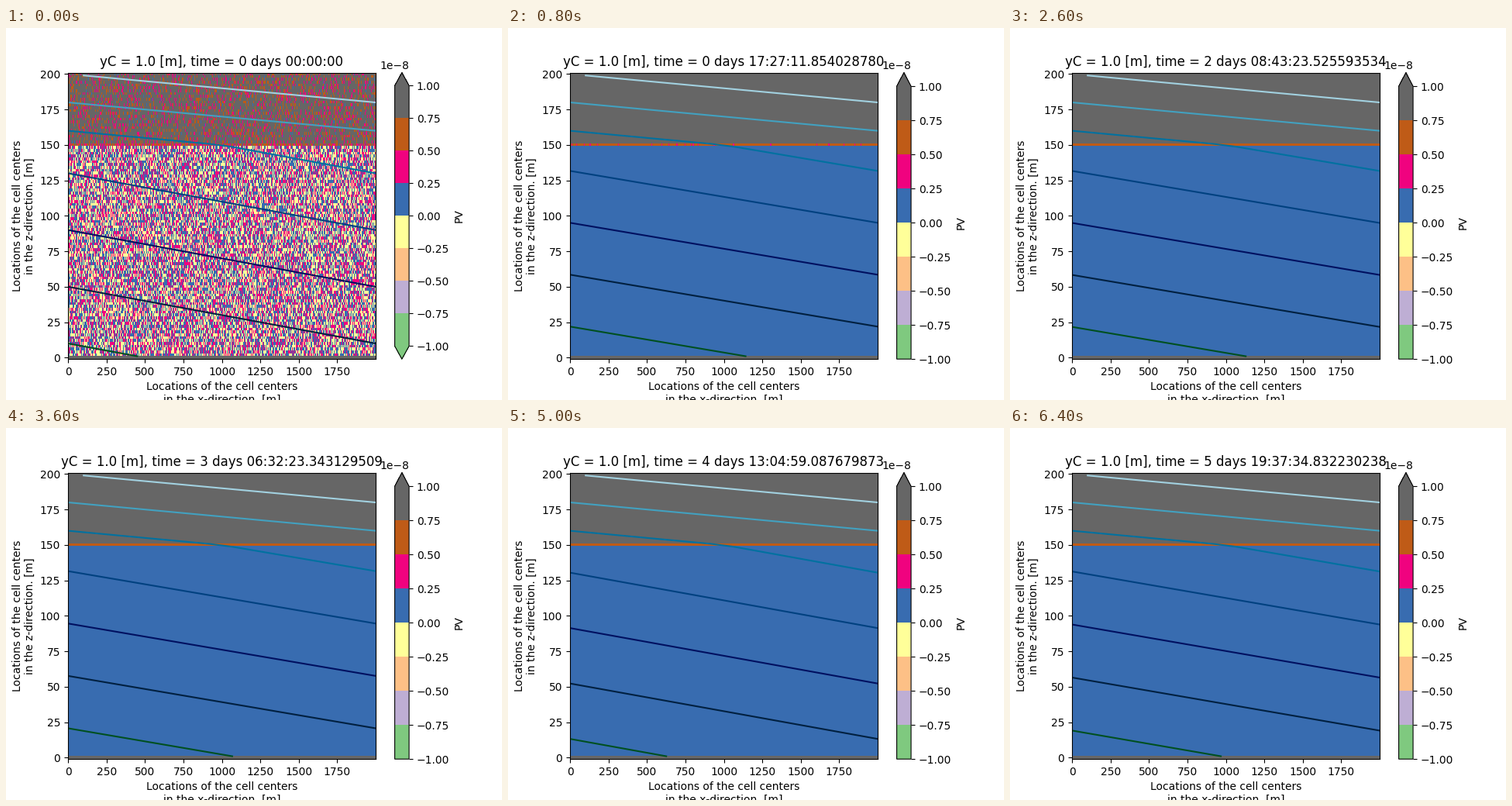
Recreate the animation shown at these times as a matplotlib script. Size 640 px wide and 480 px high, loop 6600 ms.

```python
import numpy as np
import matplotlib.pyplot as plt
from matplotlib.animation import FuncAnimation
from matplotlib.cm import ScalarMappable
from matplotlib.colors import BoundaryNorm, ListedColormap

FRAMES = 33
STEP_PS = 15707963507194937            # model time per frame, picoseconds
OMEGA = np.sqrt(2) * np.pi / 2         # oscillation phase per frame
NX, NZ = 1000, 101
INTERFACE = 75                         # grid row at z = 150 m
BLUE, PINK, BROWN, GRAY = 4, 5, 6, 7   # bins of the Accent palette
SPECKS = [5, 20, 45, 64, 88, 156, 265, 298, 320, 346, 373, 391,
          399, 416, 467, 530, 651, 800, 840, 888, 925, 945]

accent = plt.get_cmap("Accent")
ocean = plt.get_cmap("ocean")
rng = np.random.default_rng(7)


def noisy_field():
    field = rng.choice([3, BLUE, PINK], (NZ, NX), p=[0.36, 0.36, 0.28])
    top = (NZ - INTERFACE, NX)
    field[INTERFACE:] = rng.choice([BLUE, PINK, BROWN, GRAY], top,
                                   p=[0.02, 0.11, 0.14, 0.73])
    field[INTERFACE] = rng.choice([PINK, BROWN, GRAY], NX, p=[0.35, 0.4, 0.25])
    field[0] = GRAY
    return field


def layered_field(speckled):
    field = np.full((NZ, NX), BLUE)
    field[INTERFACE:] = GRAY
    field[INTERFACE] = BROWN
    field[0] = GRAY
    if speckled:
        for i in SPECKS:
            field[INTERFACE, i:i + 3] = PINK
    return field


def clock(k):
    ns = (k * STEP_PS + 500) // 1000
    seconds, frac = divmod(ns, 10**9)
    days, rest = divmod(seconds, 86400)
    text = f"{days} days {rest // 3600:02d}:{rest // 60 % 60:02d}:{rest % 60:02d}"
    return f"{text}.{frac:09d}" if frac else text


def add_colorbar(extend):
    levels = np.linspace(-1e-8, 1e-8, 9)
    count = 10 if extend == "both" else 9
    cmap = ListedColormap(accent(np.linspace(0, 1, count)))
    norm = BoundaryNorm(levels, count, extend=extend)
    cax = fig.add_axes([0.78375, 0.11, 0.028875, 0.77])
    bar = fig.colorbar(ScalarMappable(norm, cmap), cax=cax, label="PV")
    bar.set_ticks(levels)
    cax.yaxis.set_offset_position("right")
    return cax


fig = plt.figure(figsize=(6.4, 4.8), dpi=100)
ax = fig.add_axes([0.125, 0.11, 0.62, 0.77])
noise, specks, calm = noisy_field(), layered_field(True), layered_field(False)
image = ax.imshow(noise, cmap=accent, vmin=-0.5, vmax=7.5, origin="lower",
                  extent=(-1, 1999, -1, 201), aspect="auto",
                  interpolation="nearest")

contours = np.arange(-3.5, 3)
lines = [ax.plot([], [], color=ocean((c + 4.5) / 8), lw=1.5)[0] for c in contours]

ax.set(xlim=(-1, 1999), ylim=(-1, 201),
       xticks=range(0, 1751, 250), yticks=range(0, 201, 25),
       xlabel="Locations of the cell centers\nin the x-direction. [m]",
       ylabel="Locations of the cell centers\nin the z-direction. [m]")
title = ax.set_title("")
bar_both, bar_max = add_colorbar("both"), add_colorbar("max")

x = np.linspace(1, 1999, 1000)
z = np.arange(1, 200, 2.0)


def update(k):
    image.set_data(noise if k == 0 else specks if k < 7 else calm)
    bar_both.set_visible(k == 0)
    bar_max.set_visible(k > 0)
    title.set_text(f"yC = 1.0 [m], time = {clock(k)}")

    # lower-layer stratification oscillates, the upper layer stays fixed
    strat = 1 + 0.05 * (1 - np.cos(OMEGA * k))
    profile = (z - 150) * np.where(z < 150, strat / 40, 1 / 20)
    for c, line in zip(contours, lines):
        line.set_data(x, np.interp(c - x / 2000, profile, z,
                                   left=np.nan, right=np.nan))
    return [image, title, *lines]


anim = FuncAnimation(fig, update, frames=FRAMES, interval=200,
                     repeat=True, repeat_delay=0, blit=False)
plt.show()
```
